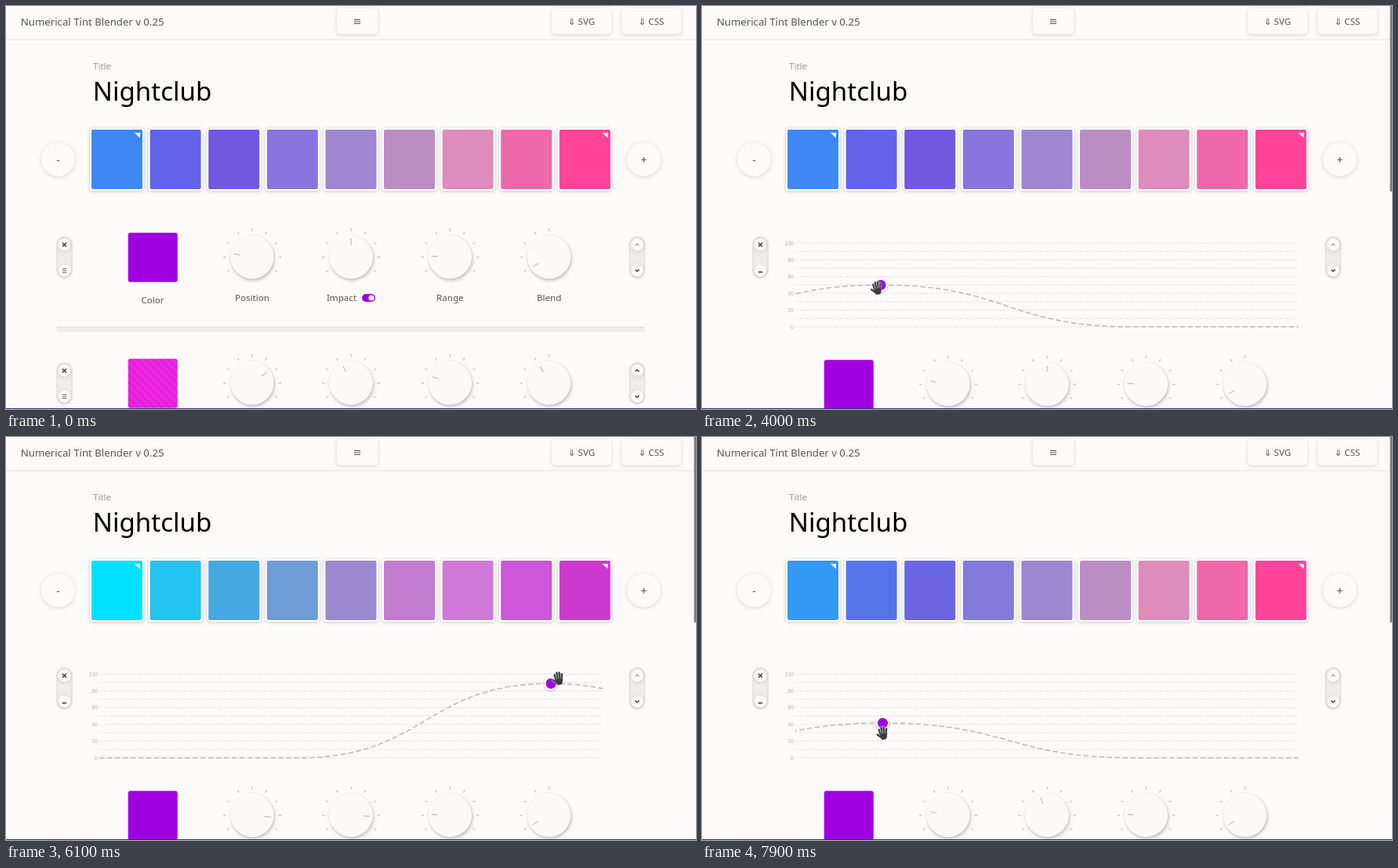
These frames come from a looping animation (880 px wide and 515 px high, 8000 ms). An HTML page:

```html
<!DOCTYPE html>
<html lang="en">
<head>
<meta charset="utf-8">
<title>Numerical Tint Blender</title>
<style>
  html, body { margin: 0; width: 100%; height: 100%; overflow: hidden; background: #fcfbf9; }
  svg { display: block; font-family: "Noto Sans", sans-serif; font-size: 11.6px; fill: #555; }
  .raised { fill: #fcfbf9; filter: drop-shadow(0 1px 2.5px #00000026); }
  .knob { fill: #fbfaf8; stroke: #fff; filter: drop-shadow(1px 2px 2px #0004); }
  .swatch { stroke: #fff; stroke-width: 2; filter: drop-shadow(0 1px 2px #0003); }
  .tick { stroke: #c8c8c6; stroke-width: 1.4; }
  .axis { font: 7px "Liberation Sans", Arial, sans-serif; fill: #b8b8b6; text-anchor: end; }
  .mid { text-anchor: middle; }
  .icon { fill: none; stroke: #444; stroke-width: 1.6; }
  .thin { stroke: #666; stroke-width: 1; }
</style>
</head>
<body>
<svg id="stage" width="880" height="515" viewBox="0 0 880 515"></svg>
<script>
const LOOP = 8000, LEFT = 119, WIDTH = 642, REACH = WIDTH / 2, ZERO = 410, TOP = 303;
const OPEN_AT = 1100, DRAG_AT = 4300, LAG = 120;
const PURPLE = '#a000e0', HOME = [228, 356.5];

// Evenly spaced gradient stops: without and with full influence of the purple layer
const plain = ['#00e1ff', '#47a9e2', '#988ecd', '#de8cba', '#ff4499'];
const tinted = [PURPLE, PURPLE, '#d24beb', '#cc72e0', '#c437dc'];

// Pointer stops: [time, x, y]
const route = [[300,37,376], [900,80,347], [1300,80,347], [1700,210,396], [1900,346,384], [2200,243,371],
  [2500,231,358], [2800,231,358], [3200,358,372], [3700,241,369], [4000,223,360], [DRAG_AT,223,360],
  [5500,579,381], [6050,712,310], [6700,612,284], [7280,230.5,304], [7400,213,307], [7600,230.5,357], [7900,230.5,378]];

const lerp = (a, b, u) => a + (b - a) * u;
const clamp = (v, lo, hi) => Math.min(hi, Math.max(lo, v));
const range = (n, f) => Array.from({length: n}, (_, i) => f(i)).join('');
const mix = (a, b, u) => `color-mix(in srgb, ${b} ${100 * u}%, ${a})`;

function pointerAt(t) {
  const i = clamp(route.findIndex(p => p[0] >= t), 1, route.length - 1);
  const [t0, x0, y0] = route[i - 1], [t1, x1, y1] = route[i];
  const u = clamp((t - t0) / (t1 - t0), 0, 1);
  return [lerp(x0, x1, u), lerp(y0, y1, u)];
}

// The handle trails the pointer and stays inside the plot
function handleAt(t) {
  if (t <= DRAG_AT) return HOME;
  const [x, y] = pointerAt(Math.max(DRAG_AT, t - LAG));
  return [clamp(x, LEFT, LEFT + WIDTH), clamp(y - 4, TOP, ZERO)];
}

// Height of the bell (cubic Béziers with half-length handles) at a distance from its peak
function bell(distance) {
  const u = Math.min(1, Math.abs(distance) / REACH);
  let lo = 0, hi = 1;
  for (let i = 0; i < 20; i++) {
    const s = (lo + hi) / 2;
    if (1.5 * s - 1.5 * s * s + s ** 3 < u) lo = s; else hi = s;
  }
  return 1 - 3 * lo * lo + 2 * lo ** 3;
}

function gradient(stops, u) {
  const at = u * (stops.length - 1), i = Math.min(Math.floor(at), stops.length - 2);
  return mix(stops[i], stops[i + 1], at - i);
}

const text = (x, y, s, attrs = 'class="mid"') => `<text x="${x}" y="${y}" ${attrs}>${s}</text>`;
const rect = (x, y, w, h, r, attrs) => `<rect x="${x}" y="${y}" width="${w}" height="${h}" rx="${r}" ${attrs}/>`;
const circle = (x, y, r, attrs) => `<circle cx="${x}" cy="${y}" r="${r}" ${attrs}/>`;
const icon = (x, y, d, attrs = '') =>
  `<g transform="translate(${x} ${y})"><path class="icon" d="${d}" ${attrs}/></g>`;
const button = (x, w, label) => rect(x, 3, w, 33, 5, 'class="raised"') + text(x + w / 2, 24, label);
const roundButton = (x, sign) => circle(x, 196, 21.5, 'class="raised"') +
  text(x, 202, sign, 'class="mid" font-size="14"');
const corner = x => `<path d="M${x - 10} 162h7v6.5z" fill="#fff"/>`;

function knob(x, y, angle, id, lastTick) {
  const ticks = range((lastTick + 120) / 30 + 1, i =>
    `<path class="tick" d="M0-37V-33.5" transform="rotate(${i * 30 - 120})"/>`);
  return `<g transform="translate(${x} ${y})">${ticks}${circle(0, 0, 27, 'class="knob"')}
    <path class="tick" id="${id}" d="M0-24V-15.5" transform="rotate(${angle})"/></g>`;
}

const BURGER = 'M-2.7-2.4H2.7M-2.7 0H2.7M-2.7 2.4H2.7', MINUS = 'M-2.7 2H2.7';
const pill = (x, y) => rect(x - 9.5, y - 10, 19, 52, 9.5, 'fill="#efeeeb" stroke="#e2e1de" stroke-width="1.5"') +
  circle(x, y, 7.7, 'class="raised"') + circle(x, y + 33, 7.7, 'class="raised"');
const pills = (y, upColor, id) => pill(74.5, y) + pill(805, y) +
  icon(74.5, y, 'M-2.5-2.5L2.5 2.5M2.5-2.5L-2.5 2.5') +
  icon(74.5, y + 33, BURGER, `id="${id}"`) +
  icon(805, y, 'M-2.5 1.3L0-1.2L2.5 1.3', `style="stroke:${upColor}"`) +
  icon(805, y + 33, 'M-2.5-1.3L0 1.2L2.5-1.3');

// One layer's row; knobs are [name, angle]
const controls = (y, fill, id, ...angles) =>
  rect(155.5, y - 31.5, 63.5, 63.5, 3, `fill="${fill}" stroke="#fff" stroke-opacity=".5"`) +
  text(187, y + 58.5, 'Color') +
  ['Position', 'Impact', 'Range', 'Blend'].map((name, i) => {
    const x = 314 + 126.2 * i;
    return knob(x, y, angles[i], id + name, name === 'Blend' ? 0 : 120) +
      text(name === 'Impact' ? x - 12.2 : x, y + 56, name);
  }).join('') +
  rect(454, y + 47, 17, 10, 5, `fill="${PURPLE}"`) + circle(466, y + 52, 3.6, 'fill="#fff"');

// Dark strokes with a light rim, drawn one after another
const stroke = (d, w, color) =>
  `<path d="${d}" stroke="${color}" fill="${color}" stroke-width="${w}" stroke-linecap="round" stroke-linejoin="round"/>`;
const rimmed = (d, w) => stroke(d, w + 1.2, '#ddd') + stroke(d, w, '#3b3b40');
const fingers = range(4, i => {
  const x = i - 1.5;
  return rimmed(`M${x * 3.1 + .5} ${x * x * 1.1 - 7}L${x * 2.3 + .5} 2`, 2.3);
});

const stage = document.getElementById('stage');
stage.innerHTML = `
  <defs>
    <pattern id="stripes" width="7" height="7" patternUnits="userSpaceOnUse" patternTransform="rotate(45)">
      <path d="M0 0H7V7H0z" fill="#f813e8"/><path d="M0 0H7V3H0z" fill="#d238cf"/>
    </pattern>
    <clipPath id="plot"><path d="M119 290H761V420H119z"/></clipPath>
  </defs>
  <path d="M0 43H880" stroke="#eeedeb" stroke-width="1.5"/>
  ${text(18.8, 25, 'Numerical Tint Blender v 0.25', 'font-size="13.2"')}
  ${button(422, 52, '')}${icon(448, 20, 'M-4-2.5H4M-4 0H4M-4 2.5H4', 'style="stroke:#555;stroke-width:1"')}
  ${button(696, 76, '⇓ SVG')}${button(785, 76, '⇓ CSS')}
  ${text(111, 81, 'Title', 'fill="#999"')}
  ${text(110.8, 121, 'Nightclub', 'fill="#000" font-size="33.1"')}
  ${range(9, i => rect(108 + 74.6 * i, 157, 67, 78, 3, 'class="swatch"'))}
  ${corner(174)}${corner(770.5)}
  ${roundButton(66.5, '-')}${roundButton(813.5, '+')}
  ${pills(305, '#aaa', 'toggle')}
  <g id="graph">
    ${range(11, i => `<path d="M119 ${TOP + 10.7 * i}H761" stroke="#dcdbd9" stroke-dasharray="1.5 1.5"/>`)}
    ${range(6, i => text(117, TOP + 21.4 * i + 2.5, 100 - 20 * i, 'class="axis"'))}
    <path id="curve" clip-path="url(#plot)" fill="none" stroke="#c0bfbe" stroke-width="1.65" stroke-dasharray="6.62 3.31"/>
    <circle id="handle" r="7.6" fill="${PURPLE}" stroke="#fff" stroke-width="2" style="filter:drop-shadow(0 1px 1.5px #0004)"/>
  </g>
  <g id="rows">
    ${controls(321, PURPLE, 'first', -79, 0, -87, -120)}
    ${rect(65, 410, 750, 6.5, 2, 'fill="#efeeeb"')}<path d="M65 410.5H815" stroke="#dddcd9"/>
    ${pills(466, '#444', 'secondToggle')}
    ${controls(482, 'url(#stripes)', 'second', 53, -25, -70, -28)}
  </g>
  <path d="M0 514.5H880" stroke="#3c2f72"/>
  <rect id="scrollbar" x="877.5" width="2.5" fill="#7c7c7c"/>
  <g id="cursor">
    <g id="arrow">${rimmed('M-3.5-8V4L-1 3L2 8L4.5 6.5L2.5 3L5.5 2z', .5)}</g>
    <g id="pointer">${rimmed('M-7 0L-2 3', 2.4)}${rimmed('M-4-6L0 2', 3)}${rimmed('M-3 2L0-1L5-1L7 2L6 8L-1 8z', 1.5)}</g>
    <g id="hand" transform="rotate(-8)">${rimmed('M-7 1.5L-3 5', 2.3)}${fingers}
      ${stroke('M-3 2H4.5L4 5.5L2.5 8H-1.5L-4 4z', 1.6, '#3b3b40')}</g>
  </g>`;

const el = id => document.getElementById(id);
const swatches = stage.querySelectorAll('.swatch');
const set = (id, attrs) => Object.entries(attrs).forEach(([k, v]) => el(id).setAttribute(k, v));
const show = (id, on) => el(id).style.display = on ? '' : 'none';
const turn = (id, u) => set(id, {transform: `rotate(${240 * u - 120})`});

function draw(t) {
  const open = t >= OPEN_AT;
  const [x, y] = handleAt(t), impact = (ZERO - y) / (ZERO - TOP);

  show('graph', open);
  set('rows', {transform: `translate(0 ${open ? 162.5 : 0})`});
  set('toggle', {d: open ? MINUS : BURGER, class: open ? 'icon' : 'icon thin'});
  set('secondToggle', {class: 'icon thin'});
  show('scrollbar', t >= 300);
  set('scrollbar', {height: open ? 237 : 277});

  const h = REACH / 2, start = x - REACH, end = x + REACH;
  set('curve', {d: `M${Math.min(LEFT, start)} ${ZERO}H${start}C${x - h} ${ZERO} ${x - h} ${y} ${x} ${y}
    S${x + h} ${ZERO} ${end} ${ZERO}H${Math.max(LEFT + WIDTH, end)}`});
  set('handle', {cx: x, cy: y});
  turn('firstPosition', (x - LEFT) / WIDTH);
  turn('firstImpact', impact);
  swatches.forEach((swatch, i) => {
    const u = i / 8;
    swatch.style.fill = mix(gradient(plain, u), gradient(tinted, u), impact * bell(LEFT + WIDTH * u - x));
  });

  const [cx, cy] = pointerAt(t);
  const onPill = cx > 65 && cx < 89;
  const grabs = cy > 292 && (t > DRAG_AT || open && Math.hypot(cx - x, cy - y) < 18);
  show('cursor', t >= 300);
  show('pointer', onPill);
  show('hand', grabs && !onPill);
  show('arrow', !grabs && !onPill);
  set('cursor', {transform: `translate(${cx} ${cy})`});
}

// The picture advances ten times a second
function frame() {
  draw(Math.floor(performance.now() % LOOP / 100) * 100);
  requestAnimationFrame(frame);
}
frame();
</script>
</body>
</html>
```
